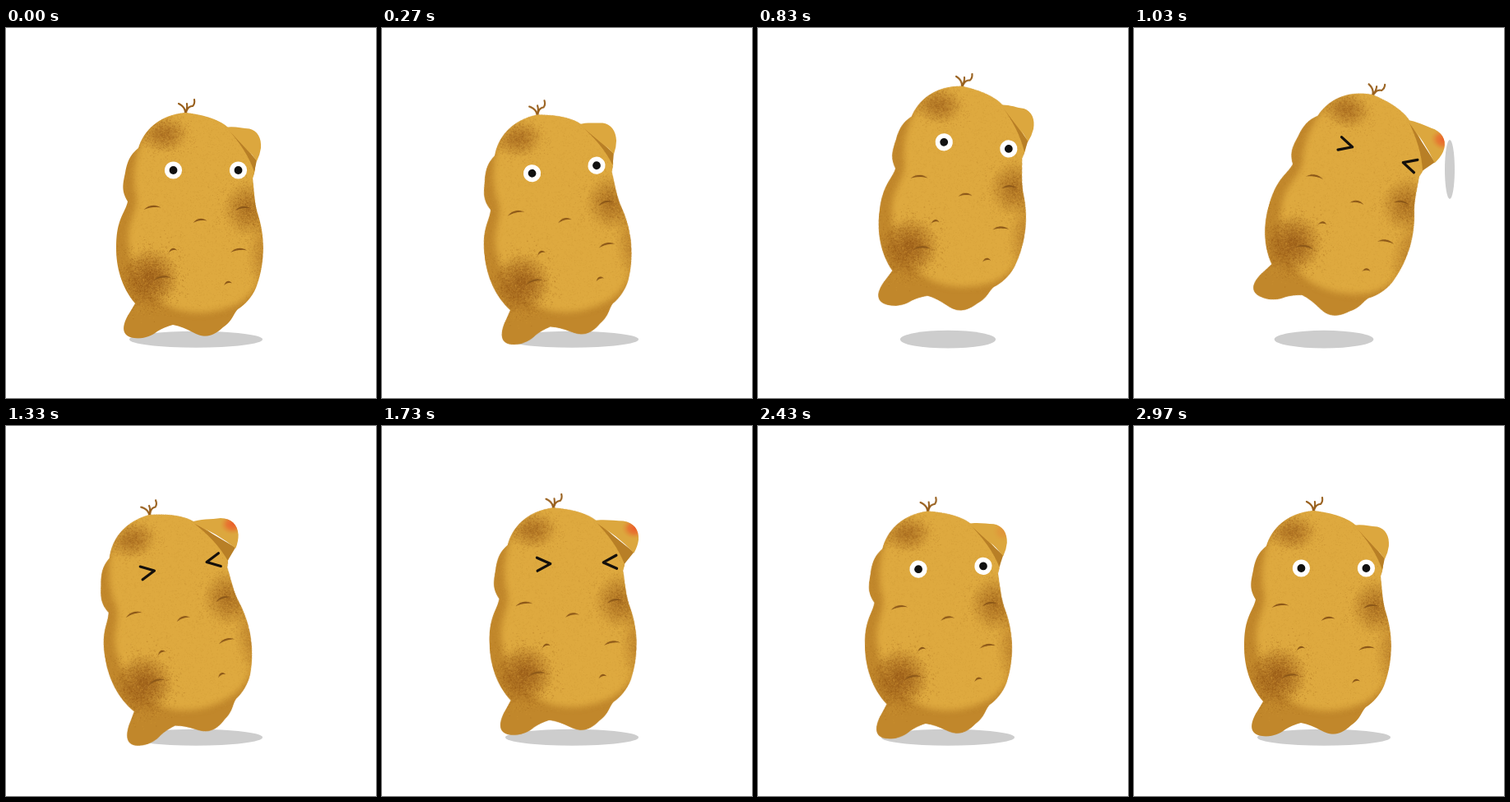
These frames come from a looping animation (450 by 450 pixels, 3.01 s). An HTML page with a canvas:

```html
<!DOCTYPE html>
<html>
<head>
<meta charset="utf-8">
<style>
html, body { margin: 0; width: 100%; height: 100%; overflow: hidden; background: #fff; }
canvas { display: block; width: 450px; height: 450px; }
</style>
</head>
<body>
<canvas id="stage" width="450" height="450"></canvas>
<script>
const LOOP = 3010, TAU = Math.PI * 2;
const ctx = document.getElementById('stage').getContext('2d');
ctx.imageSmoothingQuality = 'high';

let seed = 7;
const rand = () => (seed = (seed * 16807) % 2147483647) / 2147483647;
const gauss = () => (rand() + rand() + rand() + rand() - 2) * 0.87;

const outline = new Path2D(`M218 103C236 105 258 110 270 121Q292 138 303 162Q304 172 300 183
  C302 200 302 214 307 229C316 258 314 290 304 316C299 328 290 337 282 342C276 348 276 356 264 364
  C250 377 240 377 227 370Q214 363 203 361Q192 364 184 369C174 377 162 379 151 376
  C140 372 142 361 148 350Q153 342 157 335C140 315 134 290 134 268C134 250 136 238 143 224
  Q147 216 148 211C140 198 142 190 145 176C148 158 154 152 161 146C167 126 185 106 218 103Z`);
const lit = new Path2D(`M159 206C149 172 164 130 188 90H340V250C322 290 304 328 276 338
  C240 352 206 347 184 330C160 308 147 285 149 250C150 235 159 222 159 206Z`);
const lobe = new Path2D('M267 121C276 119 287 122 296 122.5C306 125 311 134 310 146Q309 154 305 162Q290 140 267 121Z');
const sprout = new Path2D('M218 103Q218 96 210 92M218 103Q221 98 220 92M219 103Q221 95 227 95Q230 92 229 87');

// x, y, half width, half height, strength
const spots = [[192, 129, 31, 23, 0.6], [295, 220, 32, 34, 0.62], [175, 304, 36, 37, 0.85], [315, 275, 22, 50, 0.35]];
// x, y, width
const dents = [[178, 218, 21], [236, 234, 17], [203, 270, 10], [190.5, 303.5, 21],
  [288, 219, 18], [283, 270, 20], [270, 310, 10]];

function drawSpot(g, [x, y, w, h, a]) {
  g.save();
  g.translate(x, y);
  g.scale(w, h);
  const shade = g.createRadialGradient(0, 0, 0, 0, 0, 1);
  shade.addColorStop(0, `rgba(148,86,22,${a})`);
  shade.addColorStop(0.45, `rgba(152,90,24,${a * 0.6})`);
  shade.addColorStop(1, 'rgba(160,100,28,0)');
  g.fillStyle = shade;
  g.fillRect(-1, -1, 2, 2);
  g.restore();
  for (let i = 0; i < w * h * 2; i++) {
    g.fillStyle = rand() < 0.7 ? `rgba(140,78,16,${a * 0.35})` : 'rgba(225,165,60,.3)';
    g.fillRect(x + gauss() * w, y + gauss() * h, 1, 1);
  }
}

function drawDent(g, [x, y, w]) {
  const h = w / 2;
  g.beginPath();
  g.moveTo(x - h, y + 3);
  g.quadraticCurveTo(x - 1, y - 6, x + h, y + 0.5);
  g.quadraticCurveTo(x, y - 1.5, x - h, y + 3);
  g.fill();
}

function makeSkin() {
  const canvas = document.createElement('canvas');
  canvas.width = canvas.height = 900;
  const g = canvas.getContext('2d');
  g.scale(2, 2);
  g.strokeStyle = '#985f1c';
  g.lineWidth = 2.1;
  g.lineCap = 'round';
  g.stroke(sprout);
  g.clip(outline);
  g.fillStyle = '#c1872b';
  g.fillRect(0, 0, 450, 450);
  g.filter = 'blur(8px)';
  g.fillStyle = '#dea93f';
  g.fill(lit);
  g.filter = 'none';
  for (let i = 0; i < 12000; i++) {
    g.fillStyle = rand() < 0.5 ? 'rgba(165,108,25,.12)' : 'rgba(238,186,80,.12)';
    g.fillRect(130 + rand() * 190, 100 + rand() * 250, 0.9, 0.9);
  }
  spots.forEach(s => drawSpot(g, s));
  g.fillStyle = '#8b5718';
  dents.forEach(d => drawDent(g, d));
  return canvas;
}
const skin = makeSkin();

const progress = (t, a, b) => Math.min(1, Math.max(0, (t - a) / (b - a)));
const ease = (t, a, b) => { const u = progress(t, a, b); return u * u * (3 - 2 * u); };
const arc = (t, a, b) => Math.sin(Math.PI * progress(t, a, b));

// Wind up, leap at the wall, bounce back, then settle
const tilt = t => -12.3 * ease(t, 0, 500) + 28.9 * ease(t, 590, 1000) - 31.9 * ease(t, 1015, 1225)
  + 15.3 * (1 - Math.exp(-Math.max(0, t - 1225) / 270)) - 3.1 * arc(t, 1800, 2800) ** 2;
const leap = t => arc(t, 600, 1225);
const pain = t => ease(t, 985, 1040) * (1 - ease(t, 1700, 2800));

function ellipse(x, y, rx, ry, fill) {
  ctx.fillStyle = fill;
  ctx.beginPath();
  ctx.ellipse(x, y, rx, ry, 0, 0, TAU);
  ctx.fill();
}

function drawNose(hurt) {
  const root = 270, swell = 1 + 0.26 * hurt;
  ctx.fillStyle = '#b87f26';
  ctx.beginPath();
  ctx.moveTo(267, 120);
  ctx.lineTo(root + 35 * swell, 161);
  ctx.lineTo(302, 175);
  ctx.quadraticCurveTo(293, 148, 267, 120);
  ctx.fill();
  ctx.save();
  ctx.translate(root, 0);
  ctx.scale(swell, 1);
  ctx.translate(-root, 0);
  ctx.fillStyle = '#dca73e';
  ctx.fill(lobe);
  const glow = ctx.createRadialGradient(307, 132, 0, 307, 132, 13);
  glow.addColorStop(0, `rgba(235,92,42,${hurt})`);
  glow.addColorStop(0.5, `rgba(233,108,46,${hurt * 0.75})`);
  glow.addColorStop(1, 'rgba(225,140,50,0)');
  ctx.fillStyle = glow;
  ctx.fill(lobe);
  ctx.restore();
}

function drawEyes(shut) {
  if (!shut) {
    for (const x of [203.5, 282.5]) {
      ellipse(x, 173, 10.6, 10.6, '#fff');
      ellipse(x, 173, 4.9, 4.9, '#111');
    }
    return;
  }
  ctx.strokeStyle = '#14100c';
  ctx.lineWidth = 3.2;
  ctx.lineCap = ctx.lineJoin = 'round';
  for (const [x, y, dir] of [[212, 171, 1], [276.5, 172, -1]]) {
    ctx.beginPath();
    ctx.moveTo(x - 16 * dir, y - 8);
    ctx.lineTo(x, y);
    ctx.lineTo(x - 16 * dir, y + 8);
    ctx.stroke();
  }
}

function draw(t) {
  const up = leap(t), wall = ease(t, 860, 1000) * (1 - ease(t, 1035, 1065));
  ctx.fillStyle = '#fff';
  ctx.fillRect(0, 0, 450, 450);
  ellipse(231, 378.7, 81 - 25 * up, 10 + up, '#cdcdcd');
  ellipse(384, 172, 6 * wall, 36 * wall, '#cdcdcd');
  ctx.save();
  ctx.translate(224 + 5 * up, 348 - 36 * up - 7 * arc(t, 1640, 2100));
  ctx.rotate(tilt(t) * Math.PI / 180);
  ctx.translate(-224, -348);
  ctx.drawImage(skin, 0, 0, 450, 450);
  drawNose(pain(t));
  drawEyes(t >= 990 && t < 2100);
  ctx.restore();
}

const start = performance.now();
function tick() {
  draw((performance.now() - start) % LOOP);
  requestAnimationFrame(tick);
}
tick();
</script>
</body>
</html>
```
